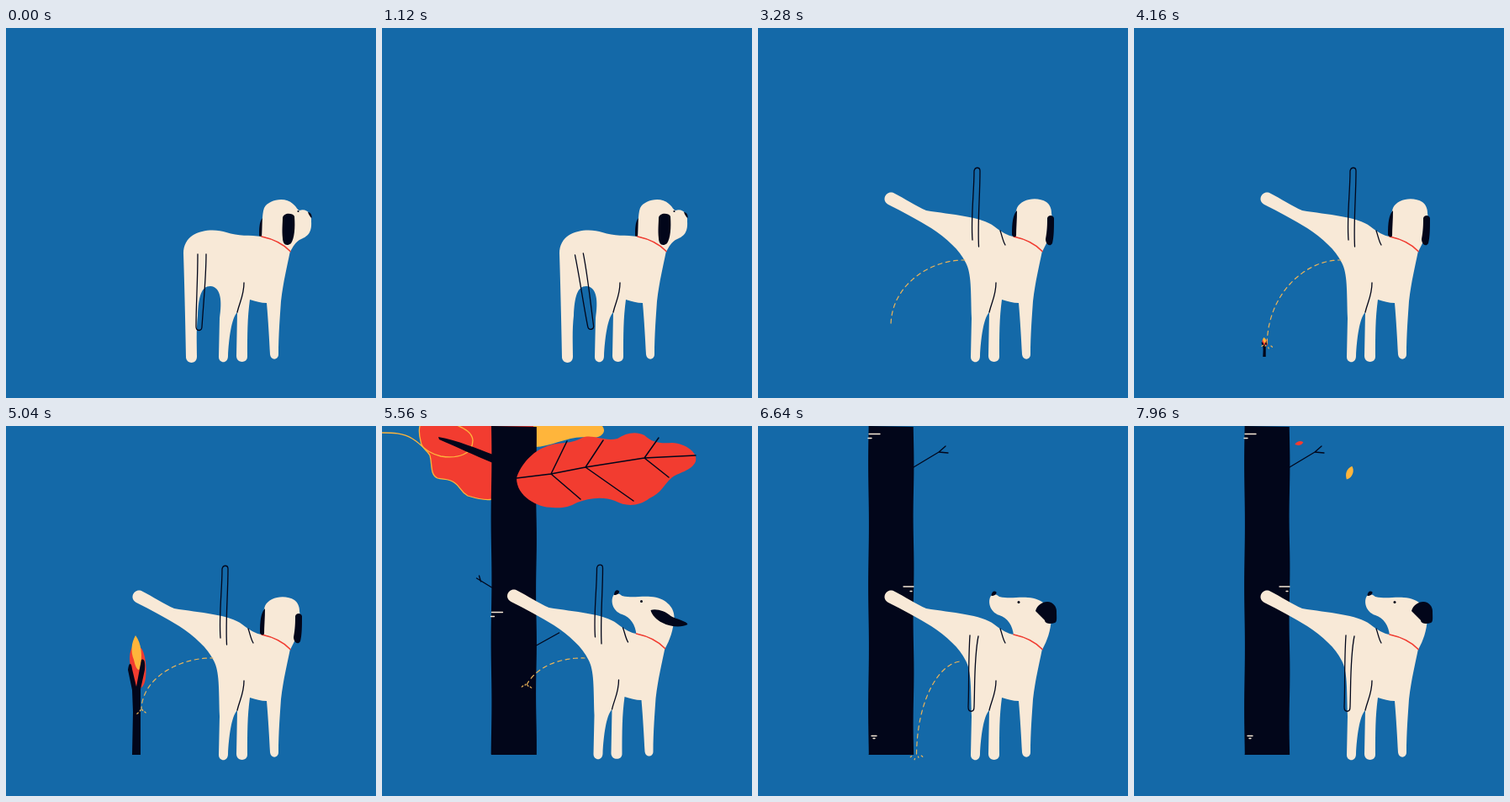
These frames come from a looping animation (440 px wide and 440 px high, 8000 ms). An HTML page with a canvas:

```html
<!DOCTYPE html>
<html lang="en">
<head>
<meta charset="utf-8">
<title>Dog and tree</title>
<style>
html, body { margin: 0; width: 100%; height: 100%; overflow: hidden; background: #1469a8; }
canvas { display: block; width: 100vw; height: 100vh; }
</style>
</head>
<body>
<canvas id="stage" width="440" height="440"></canvas>
<script>
const ctx = document.getElementById('stage').getContext('2d');
const LOOP = 8000, GROUND = 391;
const BLUE = '#1469a8', CREAM = '#f8e9d7', INK = '#02061a', RED = '#f23c30', GOLD = '#ffb53b', STREAM = '#ecb458';

const legs = ' L253 391 C253 399 264 400 264 390 C265 370 268 345 275 338 L274 390 C274 399 287 399 287 391 C287 365 287 345 290 323 C297 325 303 327 310 327 C312 350 313 370 314 388 C315 396 324 395 324 388 C324 365 326 340 327 325 C330 300 334 285 338 265 C330 257 318 250 304 248Z';
const bodies = [
  'M304 248 C290 246 276 248 262 243 C245 237 211 240 211 268 C212 300 213 340 214 392 C215 400 227 400 227 391 C227 375 226 360 228 342 C229 320 232 307 243 307 C256 308 257 325 254 345' + legs,
  'M304 248 C297 247 290 243 281 236 C266 224 230 222 200 217 C188 212 175 203 161 196 C152 193 146 205 155 210 C173 219 190 228 206 238 C224 250 240 264 247 279 C254 292 253 312 254 345' + legs
];
const nape = ' C330 257 318 250 304 248Z';
const heads = [
  'M304 249 C305 237 304 222 307 214 C312 204 332 200 341 209 C346 213 346 216 349 217 C358 214 364 222 363 230 C364 244 358 248 351 251 C344 254 341 261 338 266' + nape,
  'M304 249 C305 237 305 222 308 214 C313 203 332 200 343 207 C347 210 349 215 349 220 C350 226 350 232 349 238 C348 244 346 250 344 254 C342 258 340 262 338 266' + nape,
  'M304 249 C303 238 297 228 287 225 C275 221 273 208 277 202 C280 199 284 200 287 203 C300 206 308 203 321 204 C338 205 349 216 349 228 C348 244 344 255 338 266' + nape
];
const ears = [
  'M329 226 C330 219 341 220 343 224 C344 238 343 250 339 256 C333 261 329 256 329 250 C328 240 329 232 329 226Z',
  'M344 226 C345 222 351 222 352 226 C352 238 352 248 350 256 C347 261 342 257 342 251 C344 241 344 232 344 226Z',
  'M321 220 C328 218 338 221 345 227 C352 231 364 233 365 237 C358 241 344 240 335 235 C328 232 322 225 321 220Z',
  'M330 220 C332 213 338 209 344 209 C351 209 355 215 355 220 C355 228 356 233 353 234 C348 236 341 235 341 231 C341 226 333 224 330 220Z'
];
const farEars = [
  'M305 226 C301 230 301 240 301 247 C302 249 304 248 305 247 C305 240 306 232 305 226Z',
  'M308 217 C303 222 302 232 302 246 C303 249 307 249 307 247 C307 238 308 228 308 217Z'
];
const tails = [
  'M228 269 C228 300 226 330 226 355 C226 361 233 361 233 355 C235 325 238 295 238 269',
  'M255 252 C253 225 257 195 257 170 C258 165 264 165 264 170 C264 200 261 230 262.5 260',
  'M252 249 C250 280 251 310 250 334 C250 341 257 341 257 334 C258 305 257 275 262 250'
];

const clamp = x => Math.max(0, Math.min(1, x));
const smooth = x => x * x * (3 - 2 * x);
const lerp = (a, b, k) => a + (b - a) * k;
const ramp = (t, a, b) => smooth(clamp((t - a) / (b - a)));

// Each key is [time, value, value, ...]
function keys(t, list) {
  if (t <= list[0][0]) return list[0].slice(1);
  for (let i = 1; i < list.length; i++) {
    const a = list[i - 1], b = list[i];
    if (t <= b[0]) return a.slice(1).map((v, j) => lerp(v, b[j + 1], (t - a[0]) / (b[0] - a[0])));
  }
  return list[list.length - 1].slice(1);
}

// Blends neighbouring paths that share one command structure
function morph(paths, k) {
  const i = Math.min(Math.floor(k), paths.length - 2), number = /-?[\d.]+/g;
  const next = paths[i + 1].match(number);
  let n = 0;
  return paths[i].replace(number, v => lerp(+v, +next[n++], k - i).toFixed(2));
}

function fill(path, color) {
  ctx.fillStyle = color;
  ctx.fill(new Path2D(path));
}
function line(path, color = INK, width = 1.3) {
  ctx.strokeStyle = color;
  ctx.lineWidth = width;
  ctx.stroke(new Path2D(path));
}
function dot(x, y, r) {
  ctx.fillStyle = INK;
  ctx.beginPath();
  ctx.arc(x, y, r, 0, 7);
  ctx.fill();
}
function group(draw) {
  ctx.save();
  draw();
  ctx.restore();
}

// How far the dog and trunk lean aside while the tree shoots up
const lean = t => 1.5 * (ramp(t, 5200, 5320) - ramp(t, 5880, 6040));

function drawSprout(t) {
  const [sx, sy] = keys(t, [[3700, 0, 0], [4100, .3, .12], [4500, .6, .4], [5040, 1, 1], [5200, 1.7, 1.38]]);
  if (!sy) return;
  group(() => {
    ctx.translate(155, GROUND);
    ctx.scale(sx, sy);
    ctx.translate(-155, -GROUND);
    fill('M149 290 C145 275 148 262 153 261 L158 262 C165 265 168 285 166 300 C164 312 158 316 153 308Z', RED);
    fill('M154 249 C149 258 148 268 152 278 C154 288 158 293 159 288 C163 275 161 258 154 249Z', GOLD);
    fill('M150 391 L151 340 L150 314 L145 290 C146 281 149 280 150 289 L155 310 L161 278 C164 276 166 280 165 290 L160 313 L160 391Z', INK);
  });
}

function crown(scale, draw) {
  group(() => {
    ctx.translate(157, 90);
    ctx.scale(scale, scale);
    ctx.translate(-157, -90);
    draw();
  });
}

function drawTree(t) {
  const [rise] = keys(t, [[5240, 150], [5400, 50], [5560, 0], [5720, -90], [5880, -176], [6000, -210], [6040, -212]]);
  const [wide, size] = keys(t, [[5240, .36, .25], [5400, .75, .65], [5520, 1, 1]]);
  const twig = ramp(t, 5600, 6280);
  group(() => {
    ctx.beginPath();
    ctx.rect(0, 0, 440, GROUND);
    ctx.clip();
    ctx.translate(0, rise);
    crown(size, () => {
      const blob = 'M131 87 C123 89 112 86 102 83 C93 78 94 73 87 68 C80 62 73 64 66 62 C57 58 60 46 57 35 C53 28 47 27 46 18 C44 10 44 4 45 0 C52 -30 95 -45 131 -25';
      fill('M134 20 C115 -30 130 -80 158 -115 C190 -70 200 -20 180 20Z', RED);
      fill(blob, RED);
      line(blob, GOLD);
      line('M0 8 C12 8 25 8 36 15 C48 22 52 32 70 36 C90 39 108 34 108 17 C107 6 95 2 85 -3', GOLD);
      fill('M180 25 C200 26 225 10 245 14 C260 16 270 7 260 -2 C250 -30 210 -40 180 -25Z', GOLD);
      fill('M67 13 C90 17 113 27 132 34 L132 44 C110 35 87 24 68 16Z', INK);
    });
    group(() => {
      ctx.translate(157 - lean(t), 0);
      ctx.scale(wide, 1);
      ctx.translate(-157, 0);
      const top = Math.max(-rise, 90 - 125 * size), base = GROUND - rise;
      ctx.beginPath();
      for (let y = top; y <= base; y += 6) ctx.lineTo(131.5 + .4 * Math.sin(y * .043), y);
      ctx.lineTo(131.5, base);
      ctx.lineTo(185, base);
      for (let y = base; y >= top; y -= 6) ctx.lineTo(185 + .4 * Math.sin(y * .051 + 1), y);
      ctx.fillStyle = INK;
      ctx.fill();
      line('M132 192 L114 181 M119 185 L117 178');
      group(() => {
        ctx.translate(185, 261);
        const x = lerp(27, 30, twig), y = lerp(-15, -18, twig);
        line(`M0 0 L${x} ${y} l${8 * twig} ${-7 * twig} M${x} ${y} l${11 * twig} ${twig}`);
      });
      line('M132 221.5 H145 M131 226.5 H135 M173 403 H185 M181 408.5 H183 M135 580.5 H141 M137 583.5 H139', CREAM, 1.3);
    });
    crown(size, () => {
      fill('M160 62 C165 45 180 30 194 25 C208 18 222 23 238 14 C250 9 264 19 280 15 C290 8 302 6 312 11 C322 20 330 21 345 20 C362 21 376 32 373 42 C368 54 352 55 344 62 C335 70 332 80 318 86 C305 96 290 96 277 89 C262 83 245 86 232 91 C222 97 212 98 203 97 C185 97 160 84 160 62Z', RED);
      line('M160 62 L201 57 L242 49 L312 38 L373 35 M201 57 L220 18 M201 57 L236 87 M242 49 L263 17 M242 49 L299 89 M312 38 L329 14 M312 38 L341 61', INK, 1.5);
    });
  });
}

function drawStream(t) {
  const [sx, sy] = keys(t, [[5040, 246, 276], [5560, 241, 276], [6640, 243, 280]]);
  const [ex, ey] = keys(t, [[2960, 246, 276], [3040, 212, 282], [3160, 172, 312], [3280, 158, 354], [3400, 157, 395],
    [3800, 157, 394], [5040, 161, 338], [5560, 172, 308], [6080, 178, 322], [6640, 188.5, 393]]);
  const from = ramp(t, 6680, 7080);
  if (t < 3000) return;
  if (from < 1) {
    const bend = .35 * Math.max(0, 60 - (ey - sy));
    const xs = [sx, lerp(sx, ex, .46), ex + bend, ex], ys = [sy, sy - 1, lerp(ey, sy, .62), ey];
    const at = (p, u) => (1 - u) ** 3 * p[0] + 3 * u * (1 - u) ** 2 * p[1] + 3 * u * u * (1 - u) * p[2] + u ** 3 * p[3];
    group(() => {
      ctx.setLineDash([5, 4.5]);
      ctx.lineDashOffset = -t * .075;
      ctx.strokeStyle = STREAM;
      ctx.lineWidth = 1.2;
      ctx.beginPath();
      for (let i = 0; i <= 40; i++) {
        const u = lerp(from, 1, i / 40);
        ctx.lineTo(at(xs, u), at(ys, u));
      }
      ctx.stroke();
    });
  }
  if (t < 3400 || t > 7120) return;
  const beat = (t % 240) / 240;
  for (let i = 0; i < 4; i++) {
    const side = i - 1.5, x = ex + side * (2.5 + 2 * beat), y = ey + 3 - 4 * Math.sin(Math.PI * ((beat + i * .3) % 1));
    line(`M${x} ${y} l${side} 1.2`, STREAM, 1.2);
  }
}

function drawDog(t) {
  const lift = keys(t, [[2600, 0], [2680, .12], [2760, .5], [2840, .95], [2880, 1.04], [2960, 1]])[0];
  const turn = ramp(t, 2460, 2680) + ramp(t, 5240, 5440);
  const ear = turn + ramp(t, 6160, 6440);
  const tail = ramp(t, 2640, 2880) + ramp(t, 6160, 6440);

  if (turn < 1) fill(morph(farEars, turn), INK);
  fill(morph(bodies, lift), CREAM);
  fill(morph(heads, turn), CREAM);
  line('M283 303 C283 318 278 325 275 338');
  if (lift > .5) line('M288 241 C290 246 291 253 294 258');
  line('M304 248 C318 251 330 257 338 265.5', RED, 1.6);

  if (turn >= 1 && turn < 1.5) fill(farEars[1], INK);
  if (turn < .4) {
    dot(347.5, 218, 1.1);
    fill('M359 219 C362 219 364 222 363.5 226 C362 225 360 222 359 219Z', INK);
  }
  if (turn > 1.6) {
    dot(310, 209.5, 1.5);
    fill('M277.5 202 C277.5 197 281 195 283.5 197.5 C284 200 281 202 277.5 202Z', INK);
  }
  group(() => {
    const swing = t > 5560 && t < 6200 ? .16 * Math.sin((t - 5560) / 640 * Math.PI * 4) : 0;
    ctx.translate(325, 222);
    ctx.rotate(swing);
    ctx.translate(-325, -222);
    fill(morph(ears, ear), INK);
  });
  group(() => {
    const wag = t < 2560 ? .2 * Math.sin(t / 640 * Math.PI * 2) : 0;
    ctx.translate(233, 262);
    ctx.rotate(wag);
    ctx.translate(-233, -262);
    line(morph(tails, tail));
  });
}

function drawLeaf([x, y, angle], scale, color) {
  group(() => {
    ctx.translate(x, y);
    ctx.rotate(angle);
    ctx.scale(scale, scale);
    fill('M1 -8.5 C5 -4 4 5 -3 8 C-6 2 -5 -5 1 -8.5Z', color);
  });
}

function draw(t) {
  ctx.fillStyle = BLUE;
  ctx.fillRect(0, 0, 440, 440);
  ctx.lineCap = ctx.lineJoin = 'round';
  if (t < 5240) drawSprout(t);
  else drawTree(t);
  group(() => {
    ctx.translate(-lean(t), -.7 * lean(t));
    drawDog(t);
  });
  drawStream(t);
  if (t > 7300) {
    drawLeaf(keys(t, [[7320, 200, -10, 1], [7560, 212, 22, .5], [7760, 228, 45, 1], [7880, 246, 60, .6], [7960, 257, 56, .15]]), 1, GOLD);
    drawLeaf(keys(t, [[7640, 197, -8, .4], [7800, 178, 11, .8], [7960, 196.5, 21, 1.1]]), .6, RED);
  }
}

function frame(now) {
  const t = now % LOOP, step = t < 2800 ? 80 : 40;
  draw(Math.floor(t / step) * step);
  requestAnimationFrame(frame);
}
requestAnimationFrame(frame);
</script>
</body>
</html>
```
